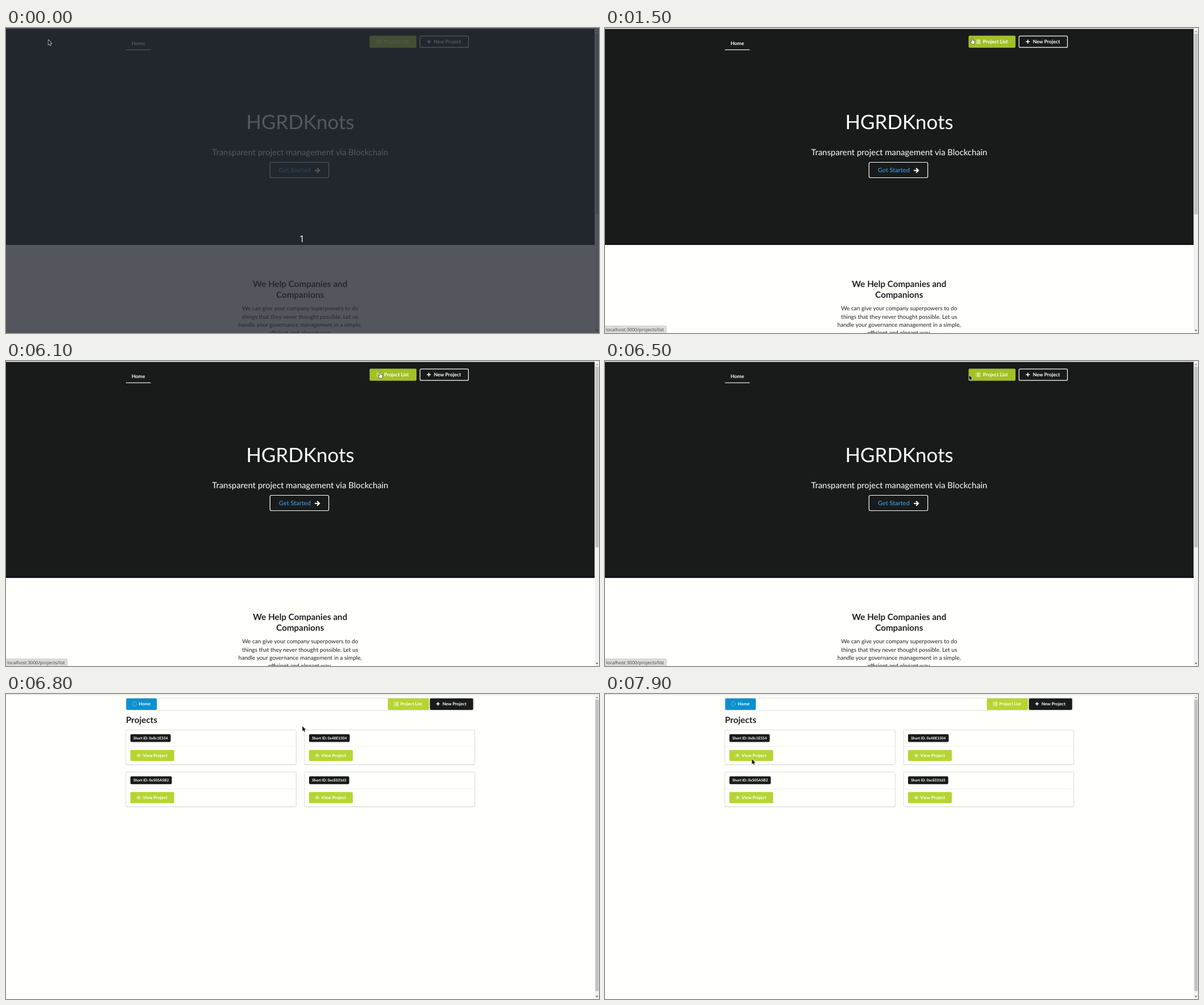
Recreate the animation shown at these times as an HTML page with a canvas. Size 1043 px wide and 537 px high, loop 8 s.

```html
<!DOCTYPE html>
<html lang="en">
<head>
<meta charset="utf-8">
<title>Project pages</title>
<style>
html, body { margin: 0; width: 100%; height: 100%; overflow: hidden; background: #fffffc; }
canvas { display: block; width: 1043px; height: 537px; }
</style>
</head>
<body>
<canvas id="stage" width="1043" height="537"></canvas>
<script>
const ctx = document.getElementById('stage').getContext('2d');
const LOOP = 8000, STEP = 100;
const PAPER = '#fffffc', INK = '#191b1a', GREEN = '#b5d534', HOVER = '#a1c126', BLUE = '#0d90cc';

// Unhinted glyph advances, as on a scaled screen
ctx.textRendering = 'geometricPrecision';

// Pointer path: time, x, y
const PATH = [
  [500, 74, 20], [700, 210, 22], [900, 540, 20], [1100, 703, 17],
  [1200, 703, 17], [1300, 639, 17], [1400, 639, 17], [1700, 657, 20],
  [6400, 657, 20], [6500, 640, 24], [6700, 557, 45], [6800, 521, 56],
  [6900, 470, 77], [7000, 433, 96], [7200, 348, 126], [7400, 285, 113],
  [7500, 285, 113], [7700, 271, 107], [7900, 258, 114]
];

function pointerAt(t) {
  const next = PATH.findIndex(p => p[0] > t);
  if (next === 0) return PATH[0].slice(1);
  if (next < 0) return PATH[PATH.length - 1].slice(1);
  const a = PATH[next - 1], b = PATH[next], k = (t - a[0]) / (b[0] - a[0]);
  return [a[1] + (b[1] - a[1]) * k, a[2] + (b[2] - a[2]) * k];
}

function rect(x, y, w, h, color) {
  ctx.fillStyle = color;
  ctx.fillRect(x, y, w, h);
}

function box(x, y, w, h, r, fill, stroke, line = 1) {
  ctx.beginPath();
  ctx.roundRect(x, y, w, h, r);
  if (fill) { ctx.fillStyle = fill; ctx.fill(); }
  if (stroke) { ctx.strokeStyle = stroke; ctx.lineWidth = line; ctx.stroke(); }
}

function text(str, x, y, size, color, weight = 400, align = 'left', family = 'Lato') {
  ctx.font = `${weight} ${size}px ${family}, sans-serif`;
  ctx.textAlign = align;
  ctx.fillStyle = color;
  ctx.fillText(str, x, y);
}

function poly(points, fill, stroke, line = 1) {
  ctx.beginPath();
  points.forEach(([x, y]) => ctx.lineTo(x, y));
  ctx.closePath();
  ctx.lineJoin = 'round';
  if (stroke) { ctx.strokeStyle = stroke; ctx.lineWidth = line; ctx.stroke(); }
  if (fill) { ctx.fillStyle = fill; ctx.fill(); }
}

function listIcon(x, y, color) {
  for (let i = 0; i < 4; i++) {
    rect(x, y - 3.4 + i * 2, 1.3, 1.1, color);
    rect(x + 2.2, y - 3.4 + i * 2, 6.2, 1.1, color);
  }
}

function plusIcon(x, y, r, color) {
  rect(x - r, y - 0.9, r * 2, 1.8, color);
  rect(x - 0.9, y - r, 1.8, r * 2, color);
}

function arrowIcon(x, y) {
  ctx.beginPath();
  ctx.moveTo(x, y);
  ctx.lineTo(x + 8, y);
  ctx.moveTo(x + 4.2, y - 4);
  ctx.lineTo(x + 8.2, y);
  ctx.lineTo(x + 4.2, y + 4);
  ctx.strokeStyle = '#fff';
  ctx.lineWidth = 2;
  ctx.lineJoin = 'miter';
  ctx.stroke();
}

function eyeIcon(x, y) {
  ctx.beginPath();
  ctx.moveTo(x - 3.8, y);
  ctx.quadraticCurveTo(x, y - 5, x + 3.8, y);
  ctx.quadraticCurveTo(x, y + 5, x - 3.8, y);
  ctx.strokeStyle = '#f2f8d8';
  ctx.lineWidth = 0.8;
  ctx.stroke();
  ctx.beginPath();
  ctx.arc(x, y - 0.3, 1.5, 0, 7);
  ctx.fillStyle = '#f2f8d8';
  ctx.fill();
}

function ringIcon(x, y) {
  ctx.beginPath();
  ctx.arc(x, y, 3.5, 0, 7);
  ctx.setLineDash([1.5, 0.7]);
  ctx.strokeStyle = '#9fd3ee';
  ctx.lineWidth = 0.9;
  ctx.stroke();
  ctx.setLineDash([]);
}

function browserFrame(thumbEnd) {
  rect(0, 0, 1043, 1, '#f2f1f0');
  rect(0, 1, 1043, 0.6, '#d5d5d3');
  rect(1035.5, 1.6, 7.5, 536, '#f1f1f1');
  rect(1036.6, 10, 5.8, thumbEnd - 10, '#c1c1c1');
  poly([[1037.3, 7.2], [1039.5, 4.8], [1041.7, 7.2]], '#8a8a8a');
  poly([[1037.3, 531.6], [1039.5, 534], [1041.7, 531.6]], '#505050');
}

function homePage(hover) {
  rect(0, 0, 1043, 537, PAPER);
  rect(0, 1, 1035.5, 381, INK);
  rect(0, 378, 1035.5, 4, '#151319');
  browserFrame(328);

  text('Home', 221, 29.6, 8.73, '#fff', 700);
  rect(211, 37.8, 43.5, 1.1, '#fff');
  box(639.5, 13.5, 82.5, 21.3, 2, hover ? HOVER : GREEN);
  listIcon(652, 24, '#f6fadf');
  text('Project List', 664.7, 27.2, 8.73, '#fff', 700);
  box(728.2, 14.1, 85.2, 20.1, 2, null, '#fff', 1.2);
  plusIcon(743.7, 24, 3.4, '#e8e8e8');
  text('New Project', 752.4, 27.2, 8.73, '#fff', 700);

  text('HGRDKnots', 517.5, 178.3, 34.9, '#fff', 400, 'center');
  text('Transparent project management via Blockchain', 517.5, 224.4, 14.84, '#fff', 400, 'center');
  box(464.4, 236.5, 103.3, 27, 2.5, null, '#fff', 1.2);
  text('Get Started', 480, 254.2, 10.95, '#3a83c1', 700);
  arrowIcon(543, 250.8);

  text('We Help Companies and', 517.3, 455.7, 15.2, '#212122', 700, 'center');
  text('Companions', 517.3, 475, 15.2, '#212122', 700, 'center');
  [
    'We can give your company superpowers to do',
    'things that they never thought possible. Let us',
    'handle your governance management in a simple,',
    'efficient and elegant way.'
  ].forEach((line, i) => text(line, 517.3, 497.4 + i * 14.2, 10.11, '#212122', 400, 'center'));
}

function projectCard(x, y, id) {
  box(x, y + 0.6, 299.6, 61.2, 2.2, '#d0d0d0');
  box(x, y, 299.6, 61, 2.2, PAPER, '#d8d8d6', 0.9);
  rect(x + 0.5, y + 29.2, 298.6, 0.7, '#e9e9e7');
  const label = 'Short ID: ' + id;
  ctx.font = '700 6.52px Lato, sans-serif';
  box(x + 8, y + 7.6, ctx.measureText(label).width + 10.4, 13.8, 2, INK);
  text(label, x + 13.2, y + 16.9, 6.52, '#fff', 700);
  box(x + 8, y + 35.2, 77, 19.6, 2, GREEN);
  eyeIcon(x + 22.4, y + 45.2);
  text('View Project', x + 29.6, y + 47.9, 7.65, '#fff', 700);
}

function projectsPage() {
  rect(0, 0, 1043, 537, PAPER);
  browserFrame(523);
  box(211, 7.4, 612.6, 21.4, 2, PAPER, '#d9d9d7', 0.9);
  box(211.5, 7.8, 53.8, 20.3, 2, BLUE);
  ringIcon(225.8, 17.5);
  text('Home', 233.6, 20.3, 7.65, '#fff', 700);
  box(671.6, 7.8, 72.4, 20.3, 2, GREEN);
  listIcon(682.2, 17.5, '#f2f8d8');
  text('Project List', 693.4, 20.3, 7.65, '#fff', 700);
  box(745.5, 7.8, 76.2, 20.3, 2, INK);
  plusIcon(759.8, 17.3, 3, '#eee');
  text('New Project', 767.8, 20.3, 7.65, '#fff', 700);
  text('Projects', 211, 51.3, 15.2, '#212122', 700);
  ['0x8c1E554', '0x48E1504', '0x505A5B2', '0xcE031d3'].forEach((id, i) =>
    projectCard(210.8 + (i % 2) * 314.2, 63.2 + (i >> 1) * 74.2, id));
}

function statusBar(alpha) {
  ctx.globalAlpha = alpha;
  box(-2, 524.5, 110, 15, 2, '#dcdcdb', '#c6c6c5', 0.8);
  text('localhost:3000/projects/list', 2, 534, 8.12, '#404040', 400, 'left', '"Open Sans"');
  ctx.globalAlpha = 1;
}

function arrowPointer(x, y) {
  const shape = [[0, 0], [0, 8.4], [1.9, 6.6], [3.2, 9.7], [4.5, 9.1], [3.2, 6.1], [5.7, 5.9]];
  poly(shape.map(([px, py]) => [x + 0.5 + px, y + 0.9 + py]), '#111', '#dedede', 1.5);
}

function handPointer(x, y) {
  const shape = [[-0.6, 0], [0.8, 0], [0.8, 3.4], [4.4, 4.2], [4.6, 7], [3.6, 9.6],
    [-0.2, 9.6], [-2.5, 6.2], [-1.7, 5.4], [-0.6, 6.4]];
  poly(shape.map(([px, py]) => [x + 0.6 + px, y + 0.3 + py]), '#fff', '#222', 1.3);
}

function draw(t) {
  const [x, y] = pointerAt(t);
  if (t >= 6800) projectsPage();
  else homePage(t >= 1100);

  if (t >= 1500 && t < 6600) statusBar(1);
  else if (t >= 6600 && t < 6800) statusBar(t < 6700 ? 0.4 : 0.04);

  if (t < 500) {
    rect(0, 0, 1043, 537, 'rgba(37, 42, 51, 0.79)');
    text('1', 520.5, 377, 16.5, '#f4f3e4', 400, 'center', '"Noto Sans"');
  }
  const hand = (t >= 1100 && t < 2200) || (t >= 6100 && t < 6500);
  (hand ? handPointer : arrowPointer)(x, y);
}

function tick(now) {
  draw(Math.floor((now % LOOP) / STEP) * STEP);
  requestAnimationFrame(tick);
}
requestAnimationFrame(tick);
</script>
</body>
</html>
```
